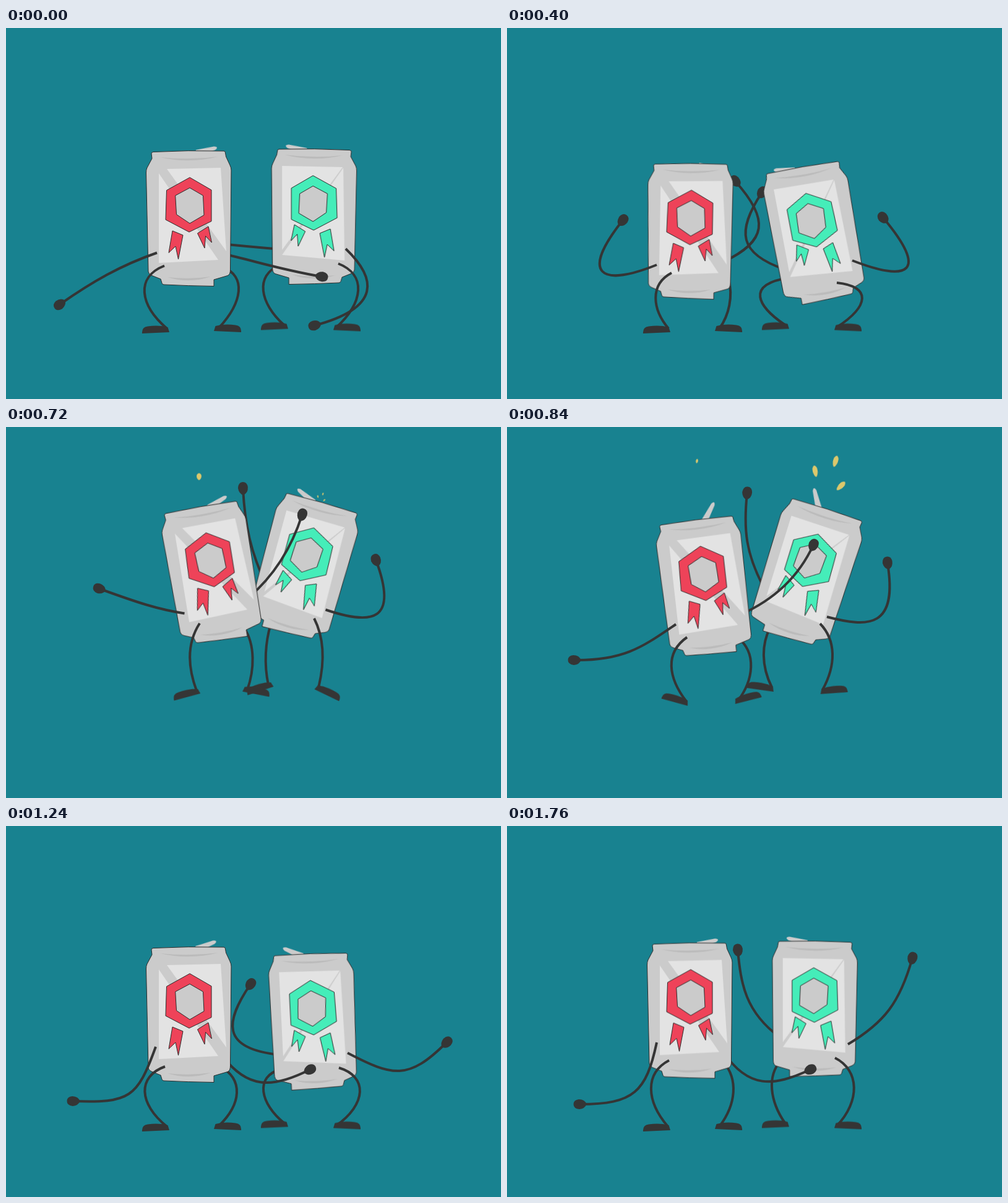
These frames come from a looping animation (800x600 px, 1.8 s). An HTML page without scripts:

```html
<!DOCTYPE html>
<html lang="en">
<head>
<meta charset="utf-8">
<title>Dancing cans</title>
<style>
html, body { margin: 0; width: 100%; height: 100%; overflow: hidden; background: #188290; }
svg { display: block; width: 100vw; height: 100vh; }

/* every track runs at 25 pictures per second */
.m { animation: 1.8s steps(6) infinite; }
.limb { fill: none; stroke: #353535; stroke-width: 4; }
.arm { marker-end: url(#hand); }
.line { stroke: #2b2b2b; stroke-width: 1; stroke-linejoin: round; }
.drop { fill: #dcc86c; }

/* cans */
.can-l { animation-name: can-l; }
@keyframes can-l {
  0% { transform: translate(294px,308px) rotate(0deg); animation-timing-function: steps(10); }
  22.222% { transform: translate(294px,328.5px) rotate(1deg); animation-timing-function: steps(2); }
  26.666% { transform: translate(295px,331px) rotate(0deg); animation-timing-function: steps(3); }
  33.333% { transform: translate(345px,215px) rotate(-12deg); }
  46.666% { transform: translate(317px,259px) rotate(-6.4deg); animation-timing-function: steps(4); }
  55.555% { transform: translate(294px,319.3px) rotate(0deg); }
  68.888% { transform: translate(294px,305px) rotate(0deg); animation-timing-function: steps(13); }
  97.777%, 100% { transform: translate(294px,298.5px) rotate(0deg); }
}
.can-r { animation-name: can-r; }
@keyframes can-r {
  0% { transform: translate(499.2px,305px) rotate(0deg); animation-timing-function: steps(10); }
  22.222% { transform: translate(498.3px,332px) rotate(-10.6deg); animation-timing-function: steps(2); }
  26.666% { transform: translate(497px,334px) rotate(-8deg); animation-timing-function: steps(3); }
  33.333% { transform: translate(480px,218.3px) rotate(13.2deg); }
  46.666% { transform: translate(486px,237.5px) rotate(17.2deg); animation-timing-function: steps(4); }
  55.555% { transform: translate(498.8px,311px) rotate(0deg); }
  68.888% { transform: translate(498.2px,315.8px) rotate(-2.8deg); animation-timing-function: steps(13); }
  97.777%, 100% { transform: translate(498.8px,295.5px) rotate(0deg); }
}
.tab-l { animation-name: tab-l; }
@keyframes tab-l {
  0% { transform: rotate(-15deg); animation-timing-function: steps(10); }
  22.222%, 33.333% { transform: rotate(10deg); }
  46.666% { transform: rotate(-57deg); animation-timing-function: steps(4); }
  55.555% { transform: rotate(-12deg); }
  68.888% { transform: rotate(-22deg); animation-timing-function: steps(13); }
  97.777%, 100% { transform: rotate(-15deg); }
}
.tab-r { animation-name: tab-r; }
@keyframes tab-r {
  0% { transform: rotate(-15deg); animation-timing-function: steps(10); }
  22.222% { transform: rotate(-12deg); animation-timing-function: steps(5); }
  33.333% { transform: rotate(10deg); }
  46.666% { transform: rotate(-60deg); animation-timing-function: steps(4); }
  55.555% { transform: rotate(-35deg); }
  68.888% { transform: rotate(-26deg); animation-timing-function: steps(13); }
  97.777%, 100% { transform: rotate(-15deg); }
}

/* arms: 1 = outer, 2 = inner */
.arm-l1 { animation-name: arm-l1; }
@keyframes arm-l1 {
  0% { d: path("M244,363.5C185,384 140,410 87,447"); animation-timing-function: steps(2); }
  4.444% { d: path("M243,368C185,385 130,398 72,430"); animation-timing-function: steps(4); }
  13.333% { d: path("M243,376C185,402 112,400 108,352"); animation-timing-function: steps(4); }
  22.222% { d: path("M242,383C150,420 118,398 187,311"); animation-timing-function: steps(2); }
  26.666% { d: path("M244,384C160,415 125,380 180,290"); animation-timing-function: steps(3); }
  33.333% { d: path("M304,284C272,235 235,190 193,146"); }
  46.666% { d: path("M273,319C220,355 190,378 109,377"); animation-timing-function: steps(4); }
  55.555% { d: path("M243,372C200,455 190,452 100,443"); }
  68.888% { d: path("M242,357C212,440 200,448 109,445"); animation-timing-function: steps(13); }
  97.777%, 100% { d: path("M242,350C225,430 205,450 118,450"); }
}
.arm-l2 { animation-name: arm-l2; }
@keyframes arm-l2 {
  0% { d: path("M350,365C400,376 440,390 510,402"); animation-timing-function: steps(10); }
  22.222% { d: path("M350,378C420,345 425,310 369,248"); animation-timing-function: steps(2); }
  26.666% { d: path("M352,378C415,345 420,295 390,225"); animation-timing-function: steps(3); }
  33.333% { d: path("M405,250C432,205 452,150 462,93"); }
  46.666% { d: path("M378,303C430,280 470,245 495,191"); animation-timing-function: steps(4); }
  55.555% { d: path("M350,388C395,432 440,430 498,401"); }
  68.888% { d: path("M350,372C390,425 430,425 491,394"); animation-timing-function: steps(13); }
  97.777%, 100% { d: path("M350,366C390,425 430,422 490,394"); }
}
.arm-r1 { animation-name: arm-r1; }
@keyframes arm-r1 {
  0% { d: path("M549,357C598,404 608,452 499,481"); animation-timing-function: steps(2); }
  4.444% { d: path("M550,361C588,405 600,460 575,518"); animation-timing-function: steps(3); }
  11.111% { d: path("M554,368C590,420 640,440 698,425"); animation-timing-function: steps(5); }
  22.222% { d: path("M558,376C650,412 682,395 608,307"); animation-timing-function: steps(2); }
  26.666% { d: path("M556,378C640,412 675,390 606,298"); animation-timing-function: steps(3); }
  33.333% { d: path("M516,284C598,317 638,305 581,211"); }
  46.666% { d: path("M517,307C585,325 632,325 615,220"); animation-timing-function: steps(4); }
  55.555% { d: path("M550,363C590,428 625,445 698,407"); }
  68.888% { d: path("M552,367C625,405 650,412 712,350"); animation-timing-function: steps(13); }
  97.777%, 100% { d: path("M551,353C610,318 635,285 655,214"); }
}
.arm-r2 { animation-name: arm-r2; }
@keyframes arm-r2 {
  0% { d: path("M445,358C410,355 360,351 290,343"); animation-timing-function: steps(10); }
  22.222% { d: path("M448,390C375,365 370,330 412,266"); animation-timing-function: steps(2); }
  26.666% { d: path("M445,392C380,365 372,330 402,245"); animation-timing-function: steps(3); }
  33.333% { d: path("M425,250C405,200 390,150 378,92"); }
  46.666% { d: path("M418,265C385,205 382,165 388,107"); animation-timing-function: steps(4); }
  55.555% { d: path("M440,365C383,368 352,340 359,257"); }
  68.888% { d: path("M442,370C345,360 355,315 395,256"); animation-timing-function: steps(13); }
  97.777%, 100% { d: path("M440,341C385,300 378,255 373,201"); }
}

/* legs */
.leg-l1 { animation-name: leg-l1; }
@keyframes leg-l1 {
  0% { d: path("M256,384.5C209,403 216,448 260,486"); animation-timing-function: steps(10); }
  22.222%, 26.666% { d: path("M266,396C230,415 235,455 261,486"); animation-timing-function: steps(3); }
  33.333% { d: path("M335,295C329,335 327,370 326,409"); }
  46.666% { d: path("M291,340C255,365 260,405 290,444"); animation-timing-function: steps(4); }
  55.555% { d: path("M254,394C203,411 213,449 260,486"); }
  68.888% { d: path("M257,389C212,405 214,449 260,486"); animation-timing-function: steps(13); }
  97.777%, 100% { d: path("M262,379C222,400 225,445 260,486"); }
}
.leg-l2 { animation-name: leg-l2; }
@keyframes leg-l2 {
  0% { d: path("M350,387C389,401 382,444 344,485"); animation-timing-function: steps(10); }
  22.222%, 26.666% { d: path("M358,405C366,435 358,465 344,485"); animation-timing-function: steps(3); }
  33.333% { d: path("M398,310C401,340 405,375 407,407"); }
  46.666% { d: path("M372,340C405,365 398,410 373,443"); animation-timing-function: steps(4); }
  55.555% { d: path("M348,394C395,410 385,450 344,485"); }
  68.888% { d: path("M345,388C385,410 380,450 344,485"); animation-timing-function: steps(13); }
  97.777%, 100% { d: path("M350,382C374,410 370,450 344,485"); }
}
.leg-r1 { animation-name: leg-r1; }
@keyframes leg-r1 {
  0% { d: path("M537,381C583,399 578,444 533,485"); animation-timing-function: steps(10); }
  22.222%, 26.666% { d: path("M533,412C590,418 585,450 533,484"); animation-timing-function: steps(3); }
  33.333% { d: path("M490,301C495,335 499,370 501,414"); }
  46.666% { d: path("M506,318C532,345 532,385 510,425"); animation-timing-function: steps(4); }
  55.555% { d: path("M538,386C585,402 580,450 533,485"); }
  68.888% { d: path("M538,391C585,405 583,450 533,485"); animation-timing-function: steps(13); }
  97.777%, 100% { d: path("M530,375C570,395 571,445 533,485"); }
}
.leg-r2 { animation-name: leg-r2; }
@keyframes leg-r2 {
  0% { d: path("M442,384C402,400 410,445 449,480"); animation-timing-function: steps(10); }
  22.222%, 26.666% { d: path("M455,404C385,415 405,450 449,480"); animation-timing-function: steps(3); }
  33.333% { d: path("M430,315C427,345 423,380 420,413"); }
  46.666% { d: path("M425,325C412,350 410,385 428,421"); animation-timing-function: steps(4); }
  55.555% { d: path("M440,388C402,405 410,445 449,480"); }
  68.888% { d: path("M445,393C400,405 412,450 449,480"); animation-timing-function: steps(13); }
  97.777%, 100% { d: path("M442,380C420,405 425,445 449,480"); }
}

/* feet */
.foot-l1 { animation-name: foot-l1; }
@keyframes foot-l1 {
  0%, 26.666% { transform: translate(260px,486px) rotate(0deg); animation-timing-function: steps(3); }
  33.333% { transform: translate(328px,408px) rotate(-43deg); }
  46.666% { transform: translate(290px,444px) rotate(18deg); animation-timing-function: steps(4); }
  55.555%, 100% { transform: translate(260px,486px) rotate(0deg); }
}
.foot-l2 { animation-name: foot-l2; }
@keyframes foot-l2 {
  0%, 26.666% { transform: translate(340px,484px) rotate(0deg); animation-timing-function: steps(3); }
  33.333% { transform: translate(403px,404px) rotate(34deg); }
  46.666% { transform: translate(371px,441px) rotate(-17deg); animation-timing-function: steps(4); }
  55.555%, 100% { transform: translate(340px,484px) rotate(0deg); }
}
.foot-r1 { animation-name: foot-r1; }
@keyframes foot-r1 {
  0%, 26.666% { transform: translate(533px,482.5px) rotate(0deg); animation-timing-function: steps(3); }
  33.333% { transform: translate(499px,415px) rotate(53deg); }
  46.666% { transform: translate(510px,425.5px) rotate(-6.6deg); animation-timing-function: steps(4); }
  55.555%, 100% { transform: translate(533px,482.5px) rotate(0deg); }
}
.foot-r2 { animation-name: foot-r2; }
@keyframes foot-r2 {
  0%, 26.666% { transform: translate(452px,480.5px) rotate(0deg); animation-timing-function: steps(3); }
  33.333% { transform: translate(426px,409px) rotate(-42deg); }
  46.666% { transform: translate(428px,421.5px) rotate(10.6deg); animation-timing-function: steps(4); }
  55.555%, 100% { transform: translate(452px,480.5px) rotate(0deg); }
}

/* drops */
.fizz { animation-name: fizz; }
@keyframes fizz {
  0%, 33.332% { transform: translate(317px,105px) rotate(-10deg) scale(0); }
  33.333% { transform: translate(317px,105px) rotate(-10deg) scale(1.5,.8); }
  46.666% { transform: translate(307px,55px) rotate(10deg) scale(.45,.4); animation-timing-function: steps(1); }
  48.888%, 100% { transform: translate(306px,50px) scale(0); }
}
.spray { animation-name: spray; }
@keyframes spray {
  0%, 37.777% { transform: translate(506px,126px) rotate(var(--r)) scale(0); animation-timing-function: steps(4); }
  46.666% { transform: translate(var(--x),var(--y)) rotate(var(--r)) scale(1); animation-timing-function: steps(3); }
  53.333%, 100% { transform: translate(var(--x),calc(var(--y) - 30px)) rotate(var(--r)) scale(0); }
}
</style>
</head>
<body>
<svg viewBox="0 0 800 600">
  <defs>
    <marker id="hand" markerUnits="userSpaceOnUse" orient="auto" markerWidth="24" markerHeight="20" viewBox="-12 -10 24 20">
      <path d="M-10.5,0Q-8,-7 1,-8Q10.5,-7 10.5,0Q10.5,7 2,8Q-8,8 -10.5,0Z" fill="#353535"/>
    </marker>
    <path id="foot" d="M4,6L-40,8Q-41,-2 -31,-3.5Q-13,-6 1.5,-2Z" fill="#353535"/>
    <path id="tab" d="M0,-5L30,-2.8Q38,0 30,3.2L0,5Z" fill="#cbcbcb"/>
    <path id="drop" d="M0,-9Q4.5,-7 4,1Q3,8 0,10Q-3,8 -4,1Q-4.5,-7 0,-9Z"/>
    <g id="shell">
      <path class="line" fill="#cbcbcb" d="M-59,-105Q-59,-107 -56,-107.5Q0,-110.5 58,-109Q60.5,-109 60.5,-106L61.5,-100L68,-86Q70,-82 70,-78L68.5,83Q68.5,91 64,92.5L42,99V109.5Q0,109 -39,107Q-41,107 -42,104.5L-44,98L-59,92Q-63.5,90 -64,86L-67.5,-74Q-67.5,-79 -66,-82L-58,-97Z"/>
      <path fill="#bbb" d="M-45,-99Q2,-94 49,-100Q2,-88 -45,-99ZM-33,95Q2,99 37,94Q2,106 -33,95Z"/>
    </g>
    <g id="medal" class="line">
      <path d="M3,-66.3L38,-46V4.5L2,22L-36,2L-34.5,-45.5Z"/>
      <path fill="#cbcbcb" d="M3,-49.5L24.5,-37L26,-5.5L3,8L-18.5,-6.5L-20.3,-37Z"/>
      <path d="M-25,20L-8,27L-15.5,66L-20,45L-31,55.5Z"/>
      <path d="M15.5,24L33,13L38.5,39L28.5,28.5L27,48Z"/>
    </g>
  </defs>

  <rect width="800" height="600" fill="#188290"/>

  <g id="right">
    <path class="m limb arm arm-r2"/>
    <path class="m limb leg-r2"/>
    <g class="m foot-r2"><use href="#foot"/></g>
    <g class="drop">
      <use href="#drop" class="m spray" style="--x:498px;--y:71px;--r:-10deg"/>
      <use href="#drop" class="m spray" style="--x:531px;--y:55px;--r:16deg"/>
      <use href="#drop" class="m spray" style="--x:540px;--y:95px;--r:45deg"/>
    </g>
    <g class="m can-r">
      <g transform="scale(-1 1)">
        <g transform="translate(14 -106)"><use href="#tab" class="m tab-r"/></g>
        <use href="#shell"/>
        <path fill="#e3e3e3" d="M53,-82L-45,-80L53,54ZM-46,-79L-48,71L53,62Z"/>
        <use href="#medal" fill="#45edb9"/>
      </g>
    </g>
    <path class="m limb leg-r1"/>
    <g class="m foot-r1"><use href="#foot" transform="scale(-1 1)"/></g>
    <path class="m limb arm arm-r1"/>
  </g>

  <g id="left">
    <path class="m limb arm arm-l2"/>
    <path class="m limb leg-l2"/>
    <g class="m foot-l2"><use href="#foot" transform="scale(-1 1)"/></g>
    <g class="drop"><use href="#drop" class="m fizz"/></g>
    <g class="m can-l">
      <g transform="translate(14 -106)"><use href="#tab" class="m tab-l"/></g>
      <use href="#shell"/>
      <path fill="#e3e3e3" d="M-34,-80L53,-82L62,53ZM-47,-73L-47,72L49,67Z"/>
      <use href="#medal" fill="#ee4359"/>
    </g>
    <path class="m limb leg-l1"/>
    <g class="m foot-l1"><use href="#foot"/></g>
    <path class="m limb arm arm-l1"/>
  </g>
</svg>
</body>
</html>
```
